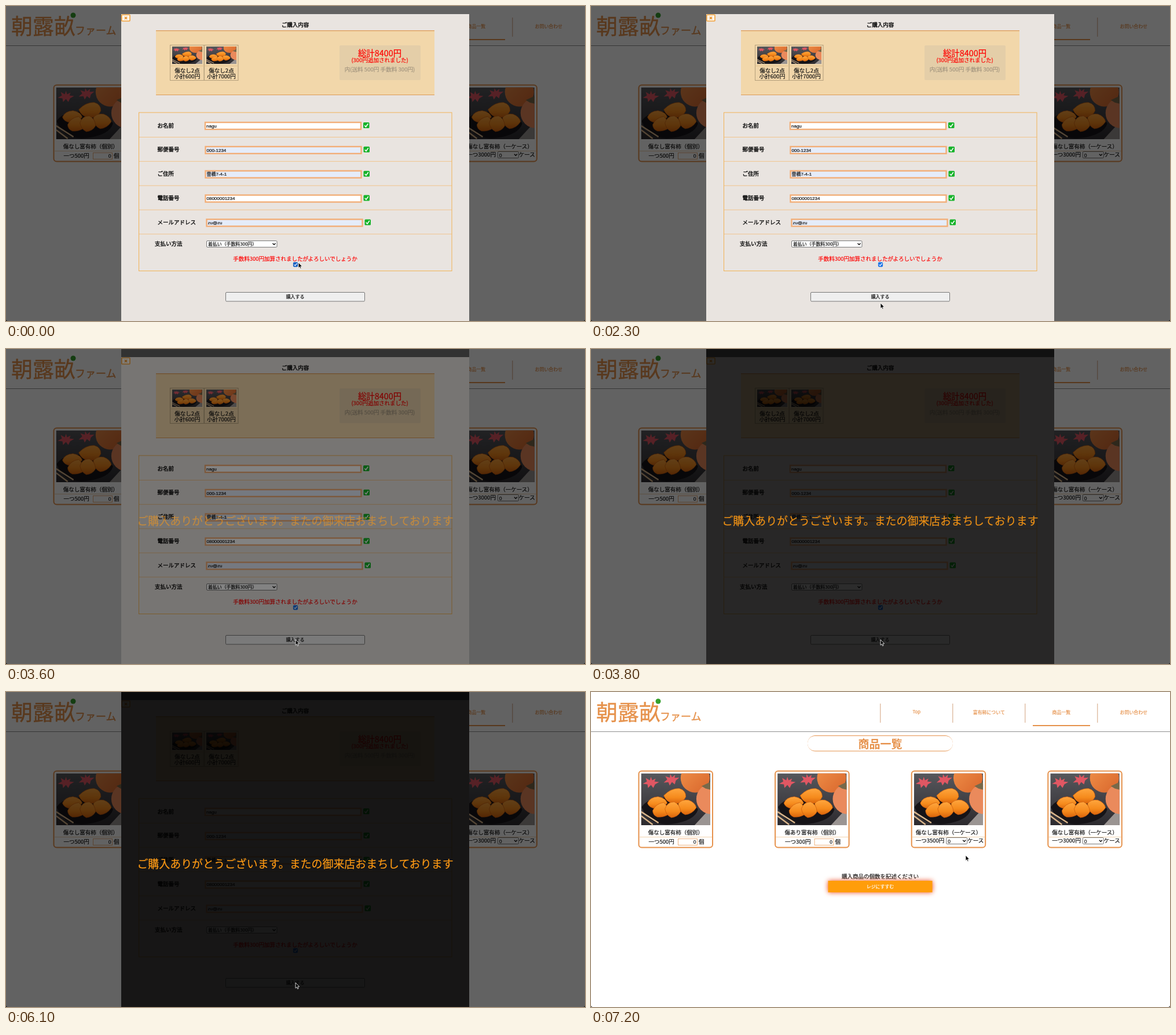
An HTML page that plays this animation: 1000x544 px, repeating every 7.3 s.

```html
<!DOCTYPE html>
<html lang="ja">
<head>
<meta charset="utf-8">
<title>ご購入内容</title>
<style>
  html, body { margin: 0; height: 100%; overflow: hidden; background: #fff; }
  svg { display: block; width: 100vw; height: 100vh; }
  text { font-family: "Noto Sans CJK JP", "Noto Sans CJK", sans-serif; text-anchor: middle; stroke-width: .2; white-space: pre; }
  .start { text-anchor: start; }
  .end { text-anchor: end; }
  .latin { font-family: "Liberation Sans", "Noto Sans CJK JP", sans-serif; }
  .medium { stroke-width: .4; }
  .bold { font-weight: 700; stroke-width: 0; }
  .glow { filter: drop-shadow(0 0 4.5px #ee4a1c); }
</style>
</head>
<body>
<svg viewBox="0 0 1000 544">
  <defs>
    <linearGradient id="table" x2="0" y2="1">
      <stop stop-color="#57585c"/><stop offset=".5" stop-color="#424146"/><stop offset="1" stop-color="#2c2a2e"/>
    </linearGradient>
    <linearGradient id="fruit" x2="1" y2="1">
      <stop stop-color="#f0924a"/><stop offset="1" stop-color="#d9662c"/>
    </linearGradient>
    <linearGradient id="slice" x2="0" y2="1">
      <stop stop-color="#ffa63e"/><stop offset=".6" stop-color="#f58a1c"/><stop offset="1" stop-color="#d9640c"/>
    </linearGradient>
    <path id="leaf" d="M0-9 2-3 8-6 6-1 14 0 7 4 4 10 0 5-5 10-6 4-14 3-7-1-9-7-2-3Z" fill="#e05763"/>
    <symbol id="photo" viewBox="0 0 119 89" preserveAspectRatio="none">
      <rect width="119" height="89" fill="url(#table)"/>
      <path d="M119 60V89H92Z" fill="#9a9492"/>
      <use href="#leaf" x="17" y="15"/>
      <use href="#leaf" x="52" y="10" transform="rotate(-12 52 10)"/>
      <circle cx="93" cy="8" r="25" fill="url(#fruit)"/>
      <circle cx="121" cy="44" r="26" fill="#ea8a5c"/>
      <path d="M104 22 119 15V28L111 26Z" fill="#77694a"/>
      <path d="M1 58Q12 40 50 42T98 62Q92 82 53 87T1 58Z" fill="#151317"/>
      <g fill="url(#slice)" stroke="#c95a0c" stroke-width=".7">
        <path d="M39 38Q52 25 66 26 77 29 77 40 72 52 57 52 43 50 39 38Z"/>
        <path d="M11 51Q15 41 29 40 42 42 45 51 38 60 26 61 13 59 11 51Z"/>
        <path d="M64 52Q70 44 82 46 93 50 95 59 88 70 76 71 65 67 64 52Z"/>
        <path d="M20 64Q25 52 39 50 47 57 48 70 38 76 28 75 20 72 20 64Z"/>
        <path d="M41 61Q45 49 57 49 67 53 68 66 63 75 52 76 43 72 41 61Z"/>
      </g>
      <path d="M0 66 30 85M0 73 20 88" stroke="#d8b48a" stroke-width="2.5"/>
    </symbol>
  </defs>
  <g id="shop"></g>
  <g id="order"></g>
  <g id="thanks"></g>
  <path d="M0 541Q0 544 3 544H0ZM1000 541Q1000 544 997 544H1000Z"/>
  <path id="cursor" d="M0 0V9.4L2.1 7.5 3.6 10.8 5.1 10.1 3.7 6.9H6.6Z" stroke="#fff" stroke-width=".8"/>
</svg>
<script>
const $ = id => document.getElementById(id);
const ORANGE = '#e6924c';

const rect = (x, y, w, h, fill, stroke = 'none', width = 1, rx = 0) =>
  `<rect x="${x}" y="${y}" width="${w}" height="${h}" rx="${rx}" fill="${fill}" stroke="${stroke}" stroke-width="${width}"/>`;
const line = (d, stroke, width = 1) => `<path d="${d}" fill="none" stroke="${stroke}" stroke-width="${width}"/>`;
const text = (s, x, y, size = 9.5, fill = '#111', cls = '') =>
  `<text x="${x}" y="${y}" font-size="${size}" fill="${fill}" stroke="${fill}" class="${cls}">${s}</text>`;
const photo = (x, y, w, h) => `<use href="#photo" x="${x}" y="${y}" width="${w}" height="${h}"/>`;
const chevron = (x, y) => line(`M${x - 2.5} ${y - 1.2}l2.5 2.5 2.5-2.5`, '#111', 1.4);

function card(i) {
  const x = 82.5 + 235.6 * i, mid = x + 63.8, byCase = i > 1;
  const name = (i === 1 ? '傷あり' : '傷なし') + '富有柿' + (byCase ? '（一ケース）' : '（個別）');
  const price = `一つ${[500, 300, 3500, 3000][i]}円`;
  const amount = byCase
    ? text(price, x + 7, 259.5, 9.5, '#111', 'start') +
      rect(x + 60, 251.5, 36, 11, '#fff', '#777', 1, 1.5) +
      text('0', x + 62.5, 260.5, 8.5, '#111', 'start latin') + chevron(x + 91, 257) +
      text('ケース', x + 96.5, 259.5, 9.5, '#111', 'start')
    : text(price, x + 17, 262, 9.5, '#111', 'start') +
      rect(x + 68, 253.5, 33, 11, '#fff', '#eeb27e') +
      text('0', x + 99, 262, 8.5, '#111', 'end latin') +
      text('個', x + 103.5, 262, 9.5, '#111', 'start');
  return rect(x, 136.5, 127.5, 132, '#fff', ORANGE, 2, 5) + photo(x + 4, 140.5, 119.5, 89.5) +
    text(name, mid, 245.5) + line(`M${x + 1} 250.5h125.5`, '#f3d3ae') + amount;
}

function header() {
  const items = ['Top', '富有柿について', '商品一覧', 'お問い合わせ'];
  return text('朝露畝', 9, 49, 37, ORANGE, 'start medium') + text('ファーム', 119, 48.5, 18, ORANGE, 'start medium') +
    '<circle cx="116" cy="16" r="4.5" fill="#35a02c"/>' +
    items.map((s, i) => line(`M${499.8 + 125 * i} 20v33`, '#d3a27c') +
      text(s, 562.3 + 125 * i, i ? 38 : 36.5, 7.9, ORANGE)).join('') +
    line('M763 58h99', ORANGE, 2) + line('M0 68.5h1000', '#8f8f8f');
}

// Borders above and below only, tapering round the corners
const capsule = rect(374, 75, 251, 27.5, ORANGE, 'none', 0, 13.7) + rect(374, 76, 251, 25.5, '#fff', 'none', 0, 12.7);

$('shop').innerHTML = rect(0, 0, 1000, 544, '#fff') + header() + capsule +
  text('商品一覧', 499.5, 97, 19, ORANGE, 'bold') +
  [0, 1, 2, 3].map(card).join('') +
  text('購入商品の個数を記述ください', 499.5, 322) +
  `<g class="glow">${rect(409.5, 326, 180, 20, '#ff9d0a')}</g>` +
  text('レジにすすむ', 499.5, 338.6, 7.9, '#fff');

const item = (x, count, sum) => rect(x, 67.5, 58.5, 61, '#f0d5a9', '#b5a07c') + photo(x + 3.5, 70, 52, 30) +
  line(`M${x} 103.5h58.5`, '#e3c08c') + text(count, x + 29.5, 115) + text(sum, x + 29.5, 125);

function field([label, value, x, fill], i) {
  const y = 206 + 41.85 * i;
  return text(label, 261.5, y + 3.5, 9.5, '#111', 'start medium') +
    rect(x + 1, y - 5, 269, 12, fill, '#f2ae78', 2.4) +
    text(value, x + 3, y + 3.7, 8, '#111', 'start latin') +
    rect(x + 274, y - 5, 10.5, 10, '#16b32a', 'none', 0, 1.5) +
    line(`M${x + 276.3} ${y + .3}l2.2 2.4 3.8-5.4`, '#fff', 1.5) +
    line(`M230 ${y + 20.5}h540`, '#f1c48c');
}

const fields = [
  ['お名前', 'nagu', 343, '#fff'],
  ['郵便番号', '000-1234', 343.5, '#e5ecfa'],
  ['ご住所', '雲橋7-4-1', 343.5, '#e5ecfa'],
  ['電話番号', '08000001234', 343.5, '#fff'],
  ['メールアドレス', 'zu@zu', 345.5, '#e5ecfa'],
];

$('order').innerHTML = rect(0, 0, 1000, 544, '#0000009d') + rect(199, 14, 601, 530, '#e9e4e0') +
  rect(199.8, 15.3, 14.2, 10.7, '#fbf3e6', '#f2a23c', 1.6, 1) + line('M205 18.7l4 4m0-4l-4 4', '#e68a20', 1.5) +
  text('ご購入内容', 499.5, 36, 9.5, '#111', 'medium') +
  rect(259, 42, 481, 112, '#f2d7aa') + line('M259 42.7h481M259 153.5h481', '#dc9a56', 1.2) +
  item(283.5, '傷なし2点', '小計600円') + item(342.5, '傷なし2点', '小計7000円') +
  rect(576, 68, 140, 60, '#e4cea8', 'none', 0, 2) +
  text('総計8400円', 645.5, 87, 14.4, '#f00') +
  text('(300円追加されました)', 645.5, 97, 9.5, '#f00') +
  text('内(送料 500円 手数料 300円)', 645.5, 112.5, 9.6, '#a2947e') +
  fields.map(field).join('') + rect(229.5, 184, 540.5, 273.5, 'none', '#f1b356') +
  text('支払い方法', 257, 414, 9.5, '#111', 'start medium') +
  rect(346.5, 405.5, 121.5, 11, '#fff', '#777', 1, 1.5) +
  text('着払い（手数料300円）', 349, 414, 7.9, '#111', 'start') + chevron(463, 411) +
  text('手数料300円加算されましたがよろしいでしょうか', 499.5, 439.5, 9.5, '#f00') +
  '<g id="confirm"></g>';

$('thanks').innerHTML = rect(199, 0, 601, 544, '#000000e6') +
  text('ご購入ありがとうございます。またの御来店おまちしております', 499.5, 304, 18.95, '#ff9a14');

function confirmState(checked, hover) {
  const blue = hover ? '#1560c4' : '#1a73e8';
  return rect(496.4, 442.9, 7.2, 7.2, checked ? blue : '#fff', checked ? blue : '#777', 1, 1.2) +
    (checked ? line('M497.6 446.6l1.8 1.8 3.2-3.9', '#fff', 1.2) : '') +
    rect(379.5, 494.5, 240, 15.5, checked ? '#efefef' : '#dfdedb', checked ? '#777' : '#bdbbb9', 1, 1.5) +
    text('購入する', 499.5, 505.2, 7.9, checked ? '#111' : '#a3a19f');
}

// Pointer path: time, x, y
const path = [[0, 505, 443], [300, 505, 443], [700, 502, 445], [1700, 502, 445], [2200, 500, 513],
  [2600, 500, 513], [3000, 500, 502], [6400, 500, 502], [7000, 647, 282], [7300, 647, 282]];
const ease = k => (1 - Math.cos(Math.PI * Math.min(1, Math.max(0, k)))) / 2;

function pointer(t) {
  const i = path.findIndex(p => p[0] > t), [t0, x0, y0] = path[i - 1], [t1, x1, y1] = path[i];
  const k = ease((t - t0) / (t1 - t0));
  return [x0 + (x1 - x0) * k, y0 + (y1 - y0) * k];
}

function draw(now) {
  const t = Math.floor(now % 7300 / 100) * 100; // ten pictures per second
  const ordering = t < 6300;
  $('order').style.display = ordering ? '' : 'none';
  // Backdrop and message fade separately, so the message blends with the darkened form
  for (const part of $('thanks').children) part.style.opacity = ordering ? ease((t - 3230) / 700) : 0;
  $('confirm').innerHTML = confirmState(t < 400 || t >= 1500, t < 1900);
  $('cursor').setAttribute('transform', `translate(${pointer(t)})`);
}

const begin = performance.now();
(function tick() {
  draw(performance.now() - begin);
  requestAnimationFrame(tick);
})();
</script>
</body>
</html>
```
